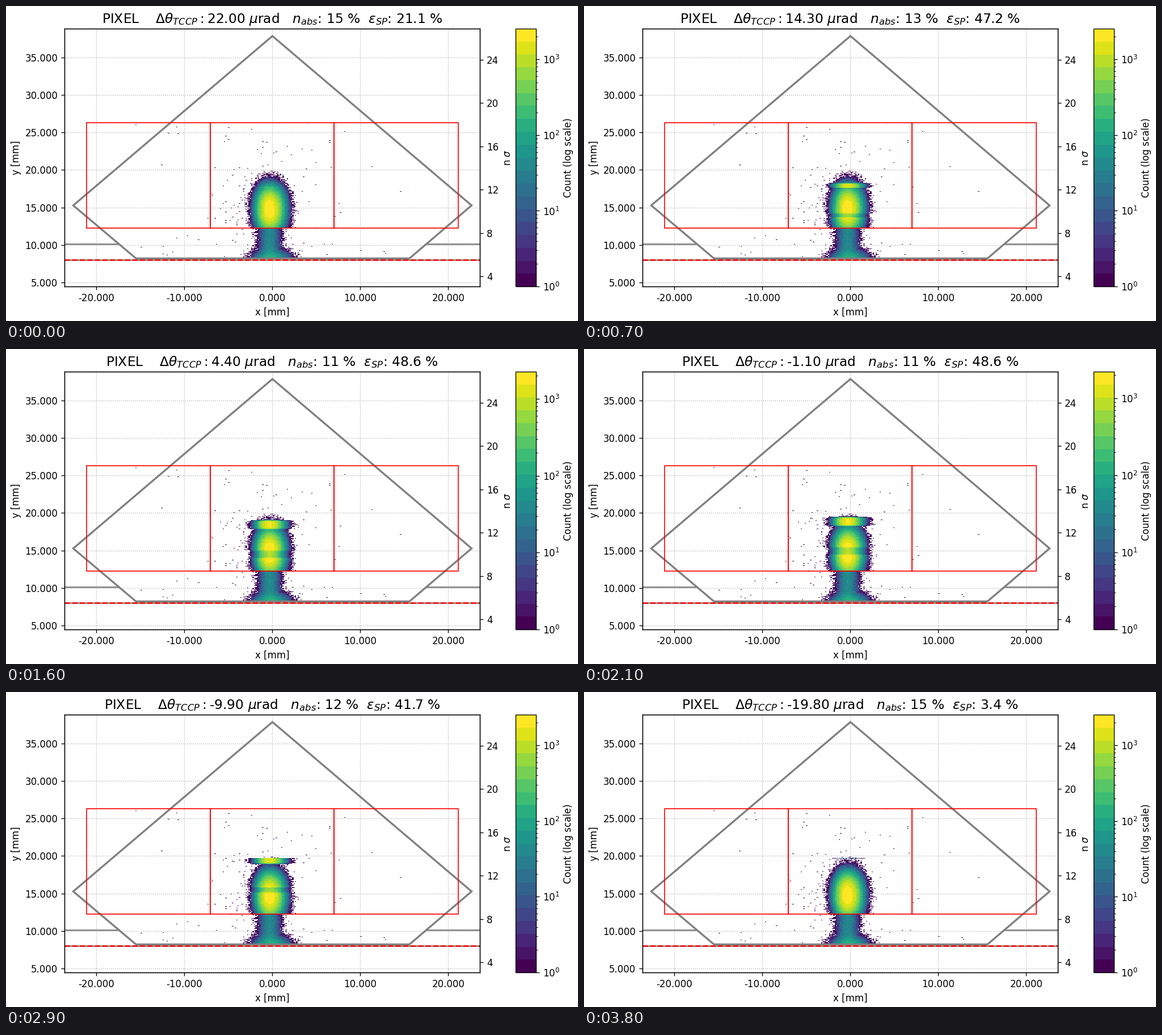
Write a matplotlib script that moves like this. It is 1008 by 556 pixels and loops after 3900 ms.

```python
import numpy as np
import matplotlib.pyplot as plt
from matplotlib.animation import FuncAnimation
from matplotlib.colors import LogNorm
from matplotlib.patches import Polygon, Rectangle
from matplotlib.ticker import FormatStrFormatter, MultipleLocator

W, H, DPI = 1008, 556, 120
FRAMES, INTERVAL = 39, 100
LEFT, RIGHT, TOP, BOTTOM = 103, 835.3, 40, 495

plt.rcParams.update({"font.family": "DejaVu Sans", "font.size": 10})


def to_mm(px, py):
    """Convert stage pixels to plot coordinates."""
    return (px - 469.2) / 15.5, 5 + (487.9 - py) / 13.233


def box(x0, y0, x1, y1):
    return [x0 / W, 1 - y1 / H, (x1 - x0) / W, (y1 - y0) / H]


# Binned beam spot
DX, DY = 0.155, 1 / 13.233
X0, Y0, NX, NY = -16.2, 8.17, 200, 240
xs = X0 + DX * (np.arange(NX) + 0.5)
ys = Y0 + DY * (np.arange(NY) + 0.5)
gx, gy = np.meshgrid(xs, ys)
SENSOR_Y, SENSOR_SIZE = 12.22, 14.08
SHIFT = 52                      # rows between the crystal and the deflected band
CRYSTAL = (13.72, 15.77)
DEPTH = 0.68


def bell(v, centre, sigma, power=2):
    return np.exp(-0.5 * np.abs((v - centre) / sigma) ** power)


def beam_counts():
    rng = np.random.default_rng(7)
    core = -0.33
    spot = 2450 * bell(gx, core, np.where(gx < core, 0.60, 0.68)) * bell(gy, 14.75, 1.4, 2.3)
    neck = (42 * bell(gx, -0.3, 0.54)
            + 130 * bell(gx, -0.1, 0.92) * bell(gy, 8.0, 0.6))
    counts = rng.poisson(np.where(gy > SENSOR_Y, spot, neck)).astype(float)

    # Stray hits: sensor halo, left shoulder, floor
    for x, y, sx, sy, hits in [(0, 19.5, 5.5, 4, 75), (-3.6, 15.8, 0.9, 2, 45),
                               (-1, 9.5, 7, 1.2, 40)]:
        col = ((rng.normal(x, sx, hits) - X0) / DX).astype(int) % NX
        row = ((rng.normal(y, sy, hits) - Y0) / DY).astype(int) % NY
        counts[row, col] = np.maximum(counts[row, col], 1)
    return counts


BEAM = beam_counts()


def deflect(n):
    """Move the part of the beam accepted by the crystal up to its band."""
    accept = DEPTH * np.exp(-((ys - 13.12 - 0.0863 * n) / 0.54) ** 8)
    accept[(ys < CRYSTAL[0]) | (ys > CRYSTAL[1])] = 0
    moved = np.rint(BEAM * accept[:, None])
    counts = BEAM - moved
    counts[SHIFT:] += moved[:-SHIFT]
    return np.ma.masked_less(counts, 1)


def absorbed(n):
    return min(15, 11 + 0.0011 * abs(n - 18.5) ** 3)


def efficiency(n):
    rise = 1 / (1 + np.exp(-0.539 * (n - 0.49)))
    loss = (0.0504 * max(0, n - 18.63)) ** 3
    return 48.65 * (rise - loss)


def peak(n):
    return 10 ** (3.407 - 0.072 * bell(n, 18.8, 3.4))


fig = plt.figure(figsize=(W / DPI, H / DPI), dpi=DPI, facecolor="white")
ax = fig.add_axes(box(LEFT, TOP, RIGHT, BOTTOM))
image = ax.imshow(deflect(0), origin="lower", aspect="auto", interpolation="nearest",
                  extent=[X0, X0 + NX * DX, Y0, Y0 + NY * DY],
                  cmap=plt.get_cmap("viridis", 20), norm=LogNorm(1, peak(0)), zorder=1)

(x_min, y_max), (x_max, y_min) = to_mm(LEFT, TOP), to_mm(RIGHT, BOTTOM)
ax.set(xlim=(x_min, x_max), ylim=(y_min, y_max), xlabel="x [mm]", ylabel="y [mm]")
ax.xaxis.set_major_locator(MultipleLocator(10))
ax.yaxis.set_major_locator(MultipleLocator(5))
for axis in (ax.xaxis, ax.yaxis):
    axis.set_major_formatter(FormatStrFormatter("%.3f"))
ax.set_axisbelow(True)
ax.grid(linestyle=":")

# Beam pipe outline, side walls and lower limit
outline = [to_mm(*p) for p in
           [(469.5, 53), (820.5, 352), (711, 445.5), (229, 445.5), (118.5, 352)]]
ax.add_patch(Polygon(outline, fill=False, edgecolor="gray", linewidth=2, zorder=2))
for x0, x1 in [(LEFT, 198), (741, RIGHT)]:
    ax.plot(*zip(to_mm(x0, 420), to_mm(x1, 420)), color="gray", linewidth=1.5)
limit = to_mm(0, 447.9)[1]
ax.axhline(limit, color="gray", linewidth=1.5)
ax.axhline(limit, color="red", linestyle="--", linewidth=1.5)

for i in range(3):
    ax.add_patch(Rectangle((SENSOR_SIZE * (i - 1.5), SENSOR_Y), SENSOR_SIZE, SENSOR_SIZE,
                           fill=False, edgecolor="red", linewidth=1, zorder=3))

sigma_ax = ax.twinx()
sigma_ax.set_ylim(3.086, 26.846)
sigma_ax.yaxis.set_major_locator(MultipleLocator(4))
sigma_ax.set_ylabel(r"n $\sigma$")

bar = fig.colorbar(image, cax=fig.add_axes(box(897.7, TOP, 934, BOTTOM)))
bar.set_label("Count (log scale)")
title = ax.set_title("", fontsize=14)


def update(n):
    image.set_data(deflect(n))
    image.set_clim(1, peak(n))
    title.set_text(
        rf"PIXEL    $\Delta\theta_{{TCCP}}:${22 - 1.1 * n:.2f} $\mu$rad"
        rf"   $n_{{abs}}$: {absorbed(n):.0f} %"
        rf"  $\varepsilon_{{SP}}$: {efficiency(n):.1f} %")
    return image, title


anim = FuncAnimation(fig, update, frames=FRAMES, interval=INTERVAL,
                     repeat=True, repeat_delay=0, blit=False)
plt.show()
```
